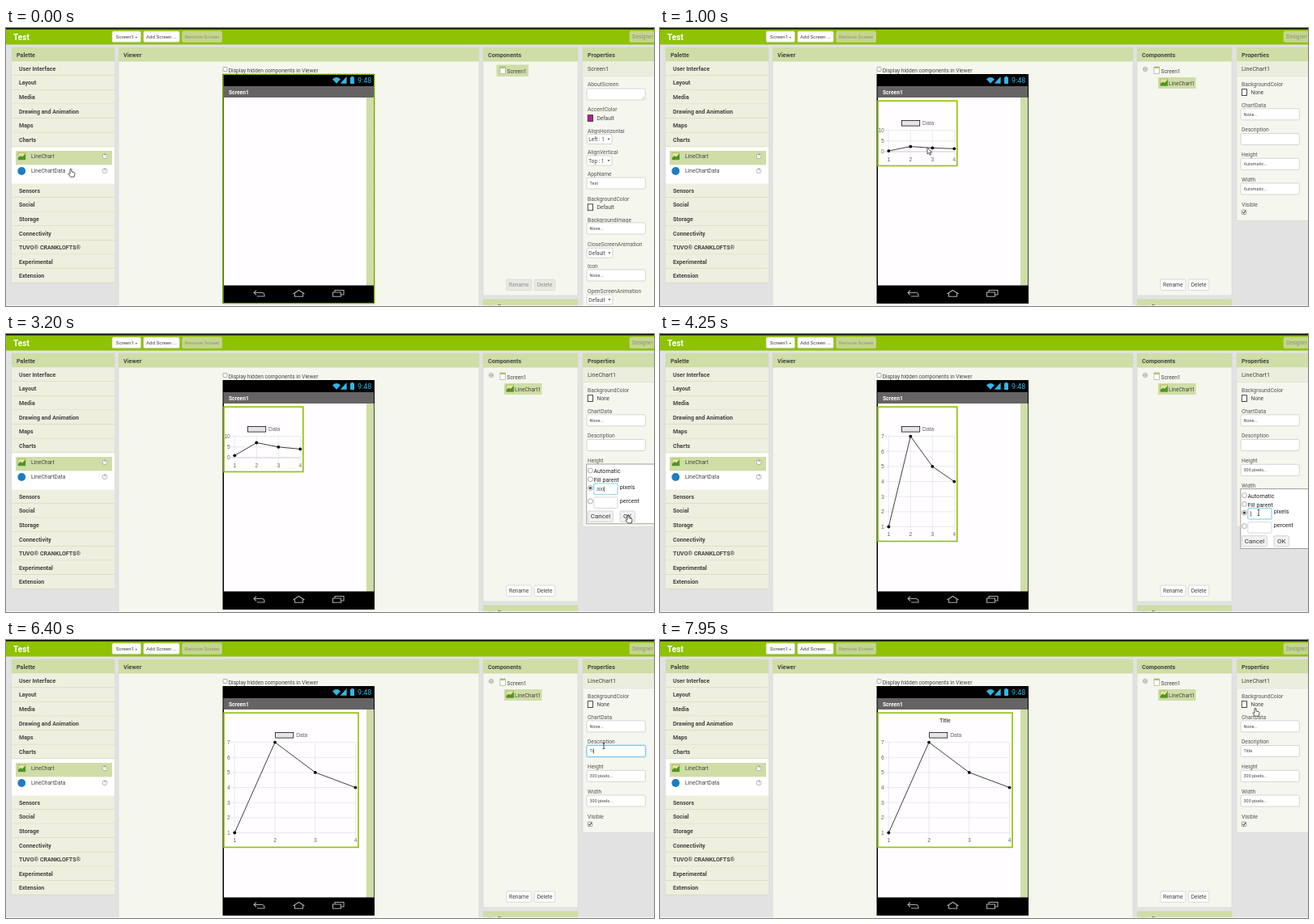
Animation, 800 px wide and 344 px high, one loop 8 s. Source, as an HTML page:

```html
<!DOCTYPE html>
<html lang="en">
<head>
<meta charset="utf-8">
<title>App designer: line chart</title>
<style>
  html, body { margin: 0; width: 100%; height: 100%; overflow: hidden; background: #e2e2e3; }
  svg { display: block; width: 100%; height: 100%; font-family: Roboto, "Open Sans", sans-serif; }
  text { white-space: pre; }
</style>
</head>
<body>
<svg viewBox="0 0 800 344" xmlns="http://www.w3.org/2000/svg">
  <g id="base"></g>
  <g id="live"></g>
</svg>
<script>
const LOOP = 8000;
const LIME = '#8fc202', SAGE = '#cfdda6', PANEL = '#f5f6ee', INK = '#444';
const SANS = 'font-family="Liberation Sans, Arial, sans-serif"';

// Moments of the interaction, in ms
const AT = {
  ghost: 300, ghostChart: 420, drop: 900,
  heightOpen: 1700, heightFocus: 2050, heightType: 2200, heightOk: 3250,
  widthOpen: 3850, widthFocus: 4150, widthType: 4300, widthOk: 5200,
  descFocus: 5950, descType: 6200, titled: 7070
};

// Pointer: time, x, y, shape
const POINTER = [
  [0, 80, 174, 'hand'], [150, 52, 157, 'hand'], [250, 56, 157, 'hand'],
  [300, 80, 156, 'arrow'], [600, 306, 152, 'arrow'], [900, 322, 148, 'arrow'],
  [1000, 330, 148, 'arrow'], [1500, 774, 161, 'arrow'], [1650, 773, 163, 'arrow'],
  [1800, 773, 163, 'arrow'], [2050, 739, 190, 'beam'], [2650, 739, 190, 'beam'],
  [3100, 768, 224, 'hand'], [3450, 768, 223, 'hand'], [3550, 745, 197, 'arrow'],
  [3900, 745, 197, 'arrow'], [4150, 739, 221, 'beam'], [4650, 739, 221, 'beam'],
  [5050, 771, 254, 'hand'], [5500, 771, 254, 'hand'], [5650, 738, 131, 'beam'],
  [7650, 738, 131, 'beam'], [7900, 735, 84, 'hand'], [8000, 735, 84, 'hand']
];

const rect = (x, y, w, h, fill, extra = '') =>
  `<rect x="${x}" y="${y}" width="${w}" height="${h}" fill="${fill}" ${extra}/>`;
const path = (d, extra) => `<path d="${d}" ${extra}/>`;
// y is the vertical middle of the lettering
const text = (x, y, str, size = 6.67, fill = INK, extra = '') =>
  `<text x="${x}" y="${y + size * 0.36}" font-size="${size}" fill="${fill}" ${extra}>${str}</text>`;
const bold = (x, y, str, size = 7.1, fill = INK) => text(x, y, str, size, fill, 'font-weight="700"');
const stroke = (color, width = 0.6) => `stroke="${color}" stroke-width="${width}"`;
const group = (x, y, body) => `<g transform="translate(${x} ${y})">${body}</g>`;

function button(x, w, y, label, size, on = true, off = '#e9e9e4') {
  return rect(x, y, w, 13.5, on ? '#fdfdfd' : off, `rx="1.5" ${stroke(on ? '#c4c4c4' : '#d0d3c4', 0.6)}`) +
    text(x + w / 2, y + 6.8, label, size, on ? INK : '#8d8f86', 'text-anchor="middle"');
}

function panel(x, w, y, h, title) {
  return rect(x, y, w, h, PANEL, stroke('#d3d5cb')) + rect(x, y, w, 17.5, SAGE) + bold(x + 6, y + 9.3, title, 7.2);
}

const chartIcon = group(0, 0,
  rect(0, 0, 9, 8.5, '#e3e69a', stroke('#7c9c3a', 0.5)) +
  path('M0 8.5V6L3 3.5L5 5L9 1V8.5Z', 'fill="#4f9426"'));

function palette() {
  const before = ['User Interface', 'Layout', 'Media', 'Drawing and Animation', 'Maps', 'Charts'];
  const after = ['Sensors', 'Social', 'Storage', 'Connectivity', 'TUVO® CRANKLOFTS®', 'Experimental', 'Extension'];
  const row = top => (name, i) => {
    const y = top + i * 17.62;
    return rect(7, y, 127, 17.2, '#eeefdf') + rect(7, y + 16.8, 127, 0.7, '#d3dab6') + bold(16, y + 8.7, name);
  };
  const help = y => `<circle cx="122" cy="${y}" r="2.9" fill="#fff" ${stroke('#888')}/>` +
    text(122, y, '?', 4.6, '#666', 'text-anchor="middle"');
  return panel(7, 127, 24, 291.5, 'Palette') +
    before.map(row(41.6)).join('') + after.map(row(192.4)).join('') +
    rect(7, 147.4, 127, 45, '#fff') + rect(12, 152, 119, 17.4, SAGE) +
    group(15, 154.5, chartIcon) + '<circle cx="19.3" cy="177" r="4.9" fill="#1d7dc2"/>' +
    text(31, 158.8, 'LineChart') + text(31, 176.8, 'LineChartData') + help(158.8) + help(176.8);
}

function phone() {
  const cyan = '#33b5e5', nav = `fill="none" ${stroke('#a8a8a8', 1.1)}`;
  return rect(268, 48.5, 5, 5, '#fff', `rx=".8" ${stroke('#888', 0.7)}`) +
    text(274.7, 52.8, 'Display hidden components in Viewer') +
    rect(267.5, 57, 187.5, 284, '#000') + rect(268.5, 72, 185.5, 14, '#666365') +
    rect(269, 86, 176, 232.5, '#fffdff') + rect(445, 86, 9.3, 232.5, SAGE) +
    bold(275, 79.2, 'Screen1', 6.7, '#fff') +
    path('M403 63.3Q408 58.6 413 63.3L408 68.8Z', `fill="${cyan}"`) +
    path('M420.6 60V68.8H412.6Z', `fill="${cyan}"`) +
    path('M425 61H426.3V59.8H428.7V61H430V69H425Z', `fill="${cyan}"`) +
    text(434, 65, '9:48', 9, cyan) +
    path('M309 324.6L306 327.5L309 330.4M306.5 327.5H316Q319.5 327.8 319 332H310', nav) +
    path('M354.5 329L361.5 324.5L368.5 329M356.5 328.5V332.2H366.5V328.5', nav) +
    path('M403.5 327H413.5V332.2H403.5ZM406 326.5V324.5H417V330H414', nav);
}

document.getElementById('base').innerHTML =
  rect(0, 0, 800, 344, '#e2e2e3') + rect(0, 0, 800, 2, '#0a0a0a') + rect(0, 1.6, 800, 18.9, LIME) +
  bold(9, 11.6, 'Test', 10.2, '#fff') +
  button(131, 35.5, 3.9, 'Screen1 <tspan font-size="4">▾</tspan>', 6.2) +
  button(169.8, 44.4, 3.9, 'Add Screen ...', 6.2) +
  button(217.7, 48.8, 3.9, 'Remove Screen', 6.2, false, '#c3d68a') +
  button(770, 32, 3.9, 'Designer', 6.5, false, '#c3d68a') +
  palette() + panel(139, 445, 24, 330, 'Viewer') + phone() +
  panel(589, 117, 24, 307, 'Components') + panel(589, 117, 335.8, 30, 'Media');

function tree(placed) {
  const screenIcon = rect(610, 48, 6.5, 8.5, '#fff', stroke('#9a9a9a')) + rect(610, 48, 6.5, 2, '#a7c957');
  const buttons = button(617.8, 31, 311, 'Rename', 6.7, placed) + button(652.3, 25.5, 311, 'Delete', 6.7, placed);
  if (!placed) return rect(605.5, 45.5, 39.5, 14.5, SAGE) + screenIcon + text(618.5, 53.6, 'Screen1') + buttons;
  return `<circle cx="599" cy="51" r="2.5" fill="#fff" ${stroke('#666')}/>` +
    path('M597.6 51H600.4', stroke('#333', 0.7)) + screenIcon + text(618.5, 53.2, 'Screen1') +
    rect(615, 61, 46.5, 14, SAGE) + group(617.8, 63, chartIcon) + text(628, 68.3, 'LineChart1') + buttons;
}

const label = (y, str) => text(718, y, str, 6.67, '#555');
const field = (y, str, focused, h = 14) =>
  (focused ? rect(715.8, y - 1.2, 75, h + 2.4, '#bfe6f7', 'rx="2.5"') : '') +
  rect(717, y, 72.3, h, '#fff', `rx="1.8" ${stroke(focused ? '#58b7dc' : '#c6c6c6', 0.7)}`) +
  text(720.6, y + 7, str, 5.4);
const select = (y, w, str) => rect(717, y, w, 12, '#fff', `rx="1.5" ${stroke('#c6c6c6', 0.7)}`) +
  text(719.3, y + 6.2, str, 6.4) + path(`M${717 + w - 5.5} ${y + 5.2}h3l-1.5 2Z`, `fill="${INK}"`);
const swatch = (y, fill, name) => rect(718.3, y - 3.8, 6.2, 7.8, fill, stroke('#333', 0.9)) + text(729.4, y, name);

function propertiesOf(name, height, body) {
  return panel(712, 92, 24, height, 'Properties') + rect(712, 41.5, 92, 18.3, '#eceedd') +
    rect(712, 59.5, 92, 0.6, '#dcdfcb') + text(718, 50.5, name, 7.2) + body;
}

const screenProperties = propertiesOf('Screen1', 330,
  label(69.7, 'AboutScreen') + field(75, '', false) + path('M785 88l3-3M787 88l1-1', stroke('#999', 0.5)) +
  label(101, 'AccentColor') + swatch(111.5, '#c2189c', 'Default') +
  label(127.3, 'AlignHorizontal') + select(131.5, 31, 'Left : 1') +
  label(153.7, 'AlignVertical') + select(158, 31, 'Top : 1') +
  label(181, 'AppName') + field(185, 'Test') +
  label(211.6, 'BackgroundColor') + swatch(221.7, '#fff', 'Default') +
  label(237.3, 'BackgroundImage') + field(241, 'None...') +
  label(268, 'CloseScreenAnimation') + select(272.3, 32, 'Default') +
  label(295, 'Icon') + field(299, 'None...') +
  label(325.5, 'OpenScreenAnimation') + select(330, 32, 'Default'));

const typed = (str, t, start, step) => str.slice(0, Math.max(0, Math.floor((t - start) / step) + 1));
const caret = (t, start, x, y) =>
  (t - start) % 1000 < 500 ? rect(x, y - 3.2, 0.6, 6.4, '#222') : '';

function chartProperties(t) {
  const size = done => t >= done ? '300 pixels...' : 'Automatic...';
  const editing = t >= AT.descFocus && t < AT.titled;
  const desc = typed('Title', t, AT.descType, 105);
  return propertiesOf('LineChart1', 214.5,
    label(69.7, 'BackgroundColor') + swatch(79.5, '#fff', 'None') +
    label(95.3, 'ChartData') + field(99.8, 'None...') +
    label(126, 'Description') + field(130.5, desc, editing) +
    (editing ? caret(t, AT.descFocus, 720.8 + desc.length * 2.1, 137.5) : '') +
    label(156.7, 'Height') + field(161.3, size(AT.heightOk)) +
    label(187.5, 'Width') + field(192, size(AT.widthOk)) +
    label(218.3, 'Visible') + rect(718.3, 225.2, 5.4, 5.4, '#fff', `rx=".8" ${stroke('#777', 0.7)}`) +
    path('M719.4 227.8L720.7 229.4L722.8 226', `fill="none" ${stroke('#222', 1)}`));
}

function popup(y, t, focusAt, typeAt) {
  const focused = t >= focusAt, value = typed('300', t, typeAt, 90);
  const radio = (dy, on) => `<circle cx="721.4" cy="${y + dy}" r="3" fill="#fff" ${stroke('#888', 0.7)}/>` +
    (on ? `<circle cx="721.4" cy="${y + dy}" r="1.6" fill="#444"/>` : '');
  const input = (dy, hot) => rect(725.8, y + dy, 29.3, 13.5, '#fff',
    `rx="1.5" ${stroke(hot ? '#54bde6' : '#c8c8c8', hot ? 1.2 : 0.7)} ${hot ? 'stroke-dasharray="1.4 .8"' : ''}`);
  const action = (x, w, str) => rect(x, y + 58, w, 13.4, '#f1f1f1', `rx="1.5" ${stroke('#c8c8c8', 0.7)}`) +
    text(x + w / 2, y + 64.6, str, 8, '#333', 'text-anchor="middle"');
  return rect(716.8, y, 90, 73.8, '#fff', stroke('#8c8c8c', 0.8)) +
    radio(8, !focused) + radio(18.7, false) + radio(29.5, focused) + radio(46, false) +
    text(725.4, y + 8.6, 'Automatic', 7.2, '#222') + text(725.4, y + 19.6, 'Fill parent', 7.2, '#222') +
    input(24, focused) + input(41, false) + text(757.8, y + 28, 'pixels', 7.2, '#222') +
    text(757.8, y + 45, 'percent', 7.2, '#222') + text(729, y + 31, value, 5.4) +
    (focused ? caret(t, focusAt, 729.2 + value.length * 3.03, y + 31) : '') +
    action(718.4, 31, 'Cancel') + action(758, 18.6, 'OK');
}

const easeOutQuart = p => 1 - (1 - Math.min(1, Math.max(0, p))) ** 4;

// Line chart whose frame is w by h, drawn from (268.5, 90)
function lineChart(w, h, grow, title) {
  const tall = h > 100, left = 282.3, right = 264.5 + w, top = 126.6, bottom = tall ? 238.5 : 153;
  const low = tall ? 1 : 0, high = tall ? 7 : 10, step = tall ? 1 : 5;
  const yOf = v => bottom - (v - low) / (high - low) * (bottom - top);
  const xOf = i => left + i * (right - left) / 3;
  const mid = 268.5 + w / 2;
  const tag = (x, y, str, anchor) => text(x, y, str, 6.67, '#666', `${SANS} text-anchor="${anchor}"`);
  let out = '';
  for (let v = low; v <= high; v += step) {
    out += path(`M${left - 5} ${yOf(v)}H${right}`, stroke(v ? '#dedede' : '#aaa')) + tag(276.8, yOf(v), v, 'end');
  }
  for (let i = 0; i < 4; i++) {
    out += path(`M${xOf(i)} ${top}V${bottom + 5}`, stroke('#dedede')) + tag(xOf(i), bottom + 9.3, i + 1, 'middle');
  }
  const points = [1, 7, 5, 4].map((v, i) => [xOf(i), yOf(low + (v - low) * grow)]);
  out += `<polyline points="${points.map(p => p.map(n => n.toFixed(2))).join(' ')}" fill="none" ${stroke('#111', 0.8)}/>`;
  out += points.map(([x, y]) => `<circle cx="${x}" cy="${y.toFixed(2)}" r="1.9" fill="#000"/>`).join('');
  out += rect(mid - 19.4, 114.4, 22.2, 6.7, '#e5e5e5', stroke('#111', 0.8)) + tag(mid + 6.2, 117.8, 'Data', 'start');
  if (title) out += text(mid, 99.7, 'Title', 6.67, '#555', `${SANS} font-weight="700" text-anchor="middle"`);
  return out;
}

function pointerAt(t) {
  const i = POINTER.findIndex(k => k[0] > t), a = POINTER[i - 1], b = POINTER[i];
  const p = (t - a[0]) / (b[0] - a[0]), e = p * p * (3 - 2 * p);
  return { x: a[1] + (b[1] - a[1]) * e, y: a[2] + (b[2] - a[2]) * e, shape: p < 0.5 ? a[3] : b[3] };
}

const SHAPES = {
  arrow: path('M0 0V8L1.9 6.4L3.2 9.3L4.5 8.7L3.2 5.9H5.7Z', `fill="#fff" ${stroke('#222', 0.75)}`),
  hand: path('M-1 1Q0-.6 1 1V4L4 4.6Q5.2 5 5 6.4L4.2 10.2H-.4L-3 6.6Q-3-5.2-1 6.3Z'.replace('Q-3-5.2', 'Q-3 5.2'),
    `fill="#fff" ${stroke('#222', 0.75)}`),
  beam: path('M-1.3-3.5H1.3M0-3.5V3.5M-1.3 3.5H1.3', `fill="none" ${stroke('#222', 0.75)}`)
};

function scene(t) {
  const placed = t >= AT.drop, cursor = pointerAt(t);
  let out = tree(placed) + (placed ? chartProperties(t) : screenProperties);
  if (placed) {
    const w = t >= AT.widthOk ? 167 : 98.8, h = t >= AT.heightOk ? 166.3 : 80.3, titled = t >= AT.titled;
    const grow = easeOutQuart((t - (titled ? AT.titled : AT.drop)) / 1000);
    out += rect(269, 90.2, w - 1, h, '#fffdff', stroke(LIME, 1.6)) + lineChart(w, h, grow, titled);
  } else {
    out += rect(268, 57.3, 186.7, 283.4, 'none', stroke(LIME, 1.3)) +
      rect(268, 57.3, 186.7, 283.4, 'none', stroke('#4c6600', 0.6) + ' stroke-dasharray="1.5 1.5"');
    if (t >= 400) out += rect(268.5, 85.8, 176.5, 3.8, '#1010e8');
    if (t >= AT.ghost) {
      const grow = easeOutQuart((t - AT.ghostChart) / 1000);
      out += group(cursor.x - 337, cursor.y - 127, lineChart(98.8, 80.3, grow, false));
    }
  }
  if (t >= AT.heightOpen && t < AT.heightOk) out += popup(161, t, AT.heightFocus, AT.heightType);
  if (t >= AT.widthOpen && t < AT.widthOk) out += popup(191.7, t, AT.widthFocus, AT.widthType);
  return out + group(cursor.x.toFixed(2), cursor.y.toFixed(2), SHAPES[cursor.shape]) + rect(0, 343.2, 800, 0.8, '#fff');
}

const live = document.getElementById('live');
let shown = '';
function frame() {
  const t = Math.floor(performance.now() % LOOP / 50) * 50;
  const next = scene(t);
  if (next !== shown) live.innerHTML = shown = next;
  requestAnimationFrame(frame);
}
frame();
</script>
</body>
</html>
```
